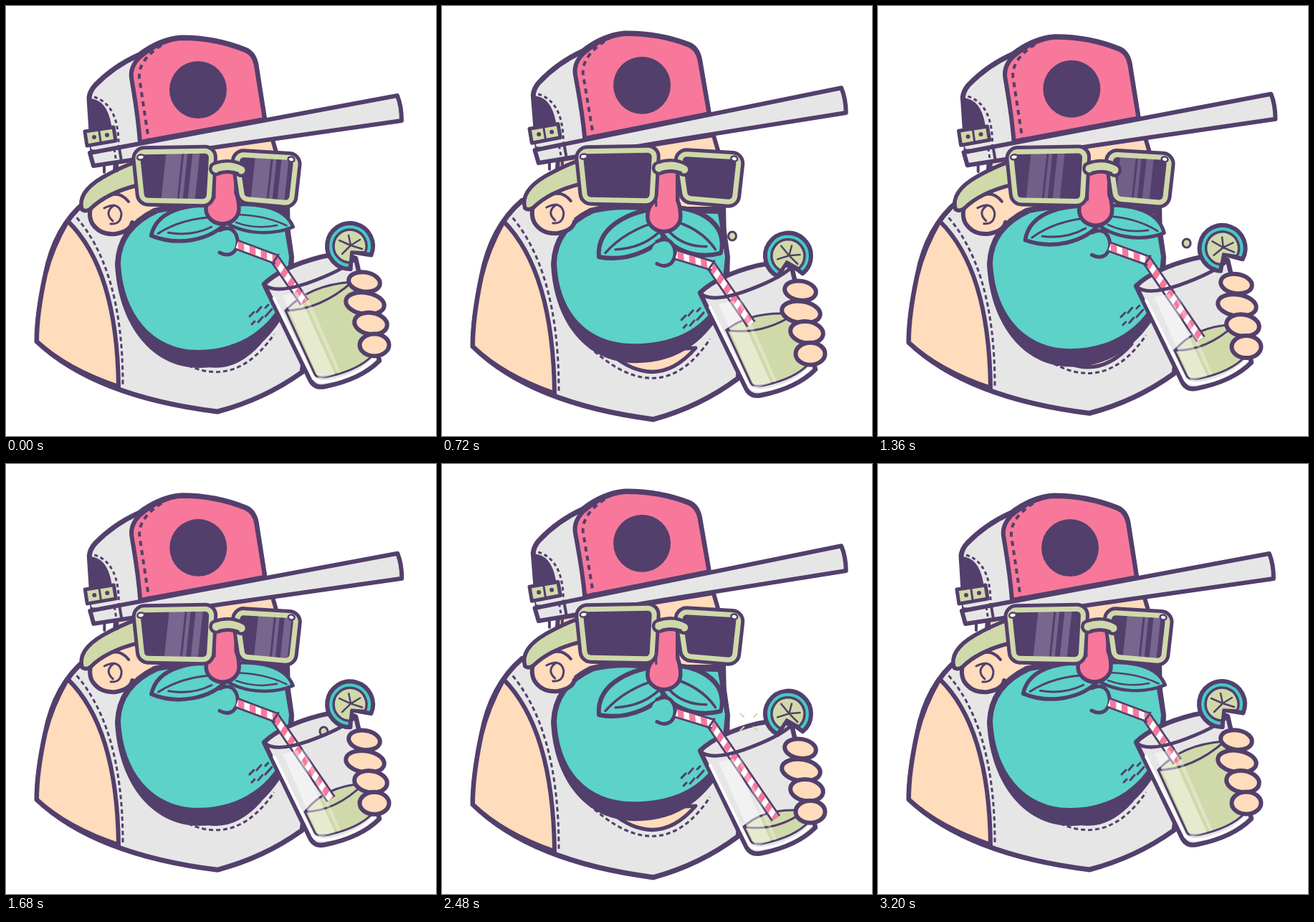
Recreate the animation shown at these times as an HTML page with a canvas. Size 600 by 600 pixels, loop 3.28 s.

```html
<!DOCTYPE html>
<html lang="en">
<head>
<meta charset="utf-8">
<title>Sipping</title>
<style>
  html, body { margin: 0; width: 100%; height: 100%; overflow: hidden; background: #fff; }
  canvas { display: block; width: 100vw; height: 100vh; }
</style>
</head>
<body>
<canvas id="stage" width="600" height="600"></canvas>
<script>
const ctx = document.getElementById('stage').getContext('2d');
const INK = '#533f6c', PINK = '#f7789a', TEAL = '#5cd2c8', GREY = '#e6e6e6',
      LIME = '#d0d9a9', SKIN = '#ffdcbc', WHITE = '#fff';
const STEP = 80, COUNT = 41, BEAT = 20;
// frame, drop of the drink's surface
const LEVELS = [[0, 0], [9, 15], [17, 53], [25, 67], [28, 71], [31, 69], [35, 46], [40, 2], [41, 0]];

function path(d, fill, width = 0, stroke = INK, dash = []) {
  const p = new Path2D(d);
  if (fill) { ctx.fillStyle = fill; ctx.fill(p); }
  if (width) {
    ctx.strokeStyle = stroke;
    ctx.lineWidth = width;
    ctx.setLineDash(dash);
    ctx.lineCap = dash.length ? 'butt' : 'round';
    ctx.stroke(p);
  }
}

function rounded(corners, r) {
  const p = new Path2D(), n = corners.length;
  const [a, b] = [corners[0], corners[n - 1]];
  p.moveTo((a[0] + b[0]) / 2, (a[1] + b[1]) / 2);
  corners.forEach((c, i) => p.arcTo(...c, ...corners[(i + 1) % n], r));
  p.closePath();
  return p;
}

function oval(x, y, rx, ry, tilt, fill, width) {
  ctx.beginPath();
  ctx.ellipse(x, y, rx, ry, tilt, 0, Math.PI * 2);
  ctx.fillStyle = fill;
  ctx.fill();
  if (width) {
    ctx.setLineDash([]);
    ctx.strokeStyle = INK;
    ctx.lineWidth = width;
    ctx.stroke();
  }
}

// Draws in a moved, turned (degrees) and scaled space.
function at(x, y, turn, draw, sx = 1, sy = 1) {
  ctx.save();
  ctx.translate(x, y);
  ctx.rotate(turn * Math.PI / 180);
  ctx.scale(sx, sy);
  draw();
  ctx.restore();
}

function lookup(points, x) {
  const i = points.findIndex(p => p[0] > x);
  const [x0, y0] = points[i - 1], [x1, y1] = points[i];
  return y0 + (y1 - y0) * (x - x0) / (x1 - x0);
}

function body(s) {
  at(0, -11.6 * s, 0, () => {
    path('M112 272 Q68 308 55 375 Q43 430 43 468 C80 503 150 548 295 566 Q360 549 413 511 L416 490 L396 390 L300 340 L200 280 Z', GREY, 7);
    path('M86 300 Q64 338 55 375 Q43 430 43 468 Q85 507 157 531 Q155 367 86 300 Z', SKIN, 6);
    path('M92 288 Q163 362 163 528', null, 3, INK, [6, 4]);
    path('M235 478 Q300 530 354 470 Z', SKIN, 5);
    path('M205 468 Q305 558 374 458', null, 3, INK, [6, 4]);
  }, 1, 1 + 0.04 * s);
}

function face(s) {
  const x = 9 * s;
  path(`M${153 + x} 215 L${150 + x} 262 L200 330 L394 330 L393 275 L${377 + x} 204 L${370 + x} 180 Z`, SKIN, 6);
  path(`M${150 + x} 250 L${125 + x} 268 L${140 + x} 322 L${210 + x} 300 L${205 + x} 250 Z`, SKIN);
}

function beard(s) {
  const low = 505 - 7 * s, chin = 480 - 9 * s;
  path(`M152 360 Q154 308 206 282 Q250 270 300 280 L392 280 L402 350 L400 410 C370 468 330 ${low} 270 ${low} C200 ${low} 156 440 152 360 Z`, INK);
  path(`M160 358 Q162 312 212 289 Q250 280 300 288 L385 290 L395 350 L390 402 C372 445 330 ${chin} 268 ${chin} C205 ${chin} 163 430 160 358 Z`, TEAL);
  at(-6 * s, 5 * s, 0, () => path('M340 433l6-6M350 427l6-7M352 441l6-7M362 433l9-10M362 421l4-4M347 440l-4 4', null, 3));
}

function ear() {
  path('M125 266 Q112 287 120 303 Q131 320 153 318 Q174 314 176 302 L171 266 Z', SKIN);
  path('M125 266 Q112 287 120 303 Q131 320 153 318 Q174 314 176 302', null, 6);
  path('M137 268 Q157 255 171 273', null, 4);
  path('M137 282 Q157 272 161 289 Q161 305 146 304 M151 278 Q136 288 149 300', null, 3);
}

function leaf(x, y, turn, flip, len) {
  at(x, y, turn, () => {
    path('M-4 -9 C30 -26 84 -36 104 0 C75 24 28 32 -4 12 Z', TEAL, 5.5);
    path('M8 2 Q55 -11 94 0 M20 13 Q50 18 80 3', null, 3);
  }, len, flip);
}

function whiskers(s) {
  leaf(302 + 10 * s, 290 + 3 * s, 163 - 15 * s, -1 - 0.15 * s, 1 + 0.05 * s);
  leaf(305 + 7 * s, 288 + 4 * s, 12 + 23 * s, 0.8 + 0.45 * s, 0.94 - 0.04 * s);
}

function nose(s) {
  const y = 283 + 11 * s;
  at(8 * s, 0, 0, () => {
    path(`M290 230 L288 ${y - 21} Q279 ${y - 13} 279 ${y} A23 21 0 0 0 325 ${y} Q325 ${y - 13} 321 ${y - 22} L321 230 Z`, PINK, 5.5);
    path(`M291 250 V${y - 15}`, null, 3);
  });
}

function hat(s) {
  at(118 + 13 * s, 215 - 4 * s, -0.95 * s, () => {
    ctx.translate(-118, -215);
    path('M137 220 V232 M155 220 V230', null, 4);
    path('M121 207 L116 128 Q117 119 124 111 Q150 84 186 68 Q215 46 245 44 Q292 44 334 61 Q346 66 349 82 L361 160 Z', GREY, 7);
    path('M187 190 C184 150 179 125 175 100 Q173 85 186 72 Q215 47 245 45 Q292 45 334 62 Q346 67 349 83 L361 158 Z', PINK, 6);
    path('M228 48 Q184 72 186 100 L199 187', null, 4, INK, [7, 6]);
    oval(268, 117, 40, 40, 0, INK);
    path('M116 129 Q141 130 147 166 L149 194 L120 200 Z', INK);
    path('M123 127 Q158 138 157 196', null, 3, INK, [5, 4]);
    path('M122 197 L146 193', null, 7, GREY);
    path('M110 175 L150 169 L153 188 L113 195 Z', LIME, 5);
    path('M130 175 L132 189', null, 3);
    oval(123, 183, 3, 3, 0, INK);
    oval(141, 180, 3, 3, 0, INK);
    path('M117 205 L546 125 Q552 140 552 160 L300 196 L122 223 Z', GREY, 6);
    path('M158 198 L161 216', null, 4);
    path('M151 199 L154 218', null, 3, INK, [5, 4]);
  });
}

function lens(corners, left, alpha, shift) {
  const rim = rounded(corners, 9);
  path(rim, INK, 17);
  if (alpha > 0) {
    ctx.save();
    ctx.clip(rim);
    ctx.globalAlpha = alpha;
    for (const [x, w] of [[34, 22], [59, 5], [71, 10]]) {
      path(`M${left + x + shift} 200 h${w} l-9 85 h${-w} Z`, '#77668e');
    }
    ctx.restore();
  }
  path(rim, null, 7, LIME);
}

function shades(s, frame) {
  const alpha = Math.min(1, (0.48 - s) * 3);
  const shift = ((frame + BEAT / 2) % BEAT - BEAT / 2) * 4;
  at(10 * s, -s, 0, () => {
    lens([[183, 204], [287, 202], [283, 273], [190, 271]], 190, alpha, shift);
    lens([[321, 207], [405, 212], [398, 275], [330, 269]], 315, alpha, shift);
    path('M293 227 Q312 220 328 229', null, 20);
    path('M293 227 Q312 220 328 229', null, 11, LIME);
    path('M297 232 Q312 228 324 233', null, 2.5);
    oval(188, 211, 5, 3.5, -0.2, WHITE, 2.5);
    oval(398, 214, 4.5, 3.5, 0.2, WHITE, 2.5);
  });
}

function temple(s) {
  at(10 * s, -2 * s, 0, () =>
    path('M106 284 Q99 260 135 239 Q160 225 180 218 L184 250 Q140 261 118 283 Q111 288 106 284 Z', LIME, 5.5));
}

function mouth(s) {
  at(2 * s, 16 * s, 0, () => {
    oval(307, 329, 17, 17, 0, TEAL);
    path('M298 313 Q314 305 321 319 Q327 334 317 344 Q309 350 298 344', null, 5);
  });
}

function tube(x0, y0, x1, y1) {
  const len = Math.hypot(x1 - x0, y1 - y0);
  at(x0, y0, Math.atan2(y1 - y0, x1 - x0) * 180 / Math.PI, () => {
    path(`M0 -7.5 H${len} V7.5 H0 Z`, INK);
    ctx.save();
    ctx.clip(new Path2D(`M0 -4.8 H${len} V4.8 H0 Z`));
    path(`M0 -5 H${len} V5 H0 Z`, WHITE);
    for (let x = 4; x < len + 8; x += 17) path(`M${x} 5 h9 l-4 -10 h-9 Z`, PINK);
    ctx.restore();
  });
}

function drop(frame, dy) {
  if (frame < 7 || frame > 27) return;
  const n = frame - 9;
  oval(405 + 3.2 * n, 321 - 4.94 * n + 0.773 * n * n - dy, 5.5, 6, 0, LIME, 3);
}

function burst(frame) {
  if (frame < 29 || frame > 36) return;
  const age = frame - 29, r = 4 + 2.8 * age, len = 9 - age;
  for (let i = 0; i < 4; i++) {
    at(428, 360, 45 + (frame - 31) * 11.25 + i * 90, () =>
      path(`M${r} 0 h${len}`, null, 2.4 - 0.25 * age, LIME));
  }
}

function lime(s) {
  const wedge = r => {
    const c = a => `${r * Math.cos(a)} ${r * Math.sin(a)}`;
    return `M2 8 L${c(1.55)} A${r} ${r} 0 1 1 ${c(0.4)} Z`;
  };
  at(480 + 3 * s, 335 + 1.5 * s, 28 * s, () => {
    path(wedge(32), '#45c9c4', 6);
    path(wedge(23), LIME, 3.5);
    path('M1 -1 L-15 -8 M1 -1 L-11 11 M1 -1 L-2 -15 M1 -1 L14 -9 M1 -1 L17 4', null, 2.5);
  });
}

function drink(s, frame) {
  const dy = 12.5 * s;
  at(0, dy, 0, () => {
    path('M360 388 L424 521 Q430 534 445 531 Q495 521 521 495 L488 352 Q470 343 440 350 Q385 364 360 388 Z', GREY, 6.5);
    path('M374 408 L429 520 Q437 527 460 522 Q497 512 515 491', null, 4, WHITE);
    drop(frame, dy);

    const ly = 425 + lookup(LEVELS, frame), lx = 390 + 0.45 * (ly - 425);
    const ry = ly - 40 + 18 * s, rx = 484 + 0.27 * (ry - 388);
    const mx = (lx + rx) / 2, my = (ly + ry) / 2;
    const back = `Q${mx - 14} ${my - 16} ${rx} ${ry}`;
    const front = `Q${mx + 2} ${my + 19} ${lx} ${ly}`;
    path(`M${lx} ${ly} ${back} L512 487 Q492 508 450 517 Q434 520 431 514 Z`, LIME, 3);

    // the straw shows down to where it meets the surface
    const bx = 375, by = 353 - 3.5 * s, slope = (ry - ly) / (rx - lx);
    const t = (ly + slope * (bx - lx) - by) / (0.825 - 0.565 * slope);
    tube(bx, by, bx + 0.565 * t, by + 0.825 * t);
    tube(322 + 5 * s, 333 + 2 * s, bx + 3, by + 1);
    path(`M${bx - 3} ${by + 6} L${bx + 5} ${by - 6}`, null, 3);
    path(`M${rx} ${ry} ${front}`, null, 3);

    path('M386 404 L407 399 L459 514 L437 521 Z', 'rgba(255,255,255,.45)');
    path('M412 399 L417 397 L467 511 L463 513 Z', 'rgba(255,255,255,.3)');
    path('M361 389 Q375 402 420 387 Q468 370 486 354', null, 5);
    lime(s);
    oval(500, 385, 22, 13.5, 0.15, SKIN, 6);
    oval(501, 415, 27, 15, 0.15, SKIN, 6);
    oval(509, 443, 23, 15, 0.15, SKIN, 6);
    oval(514, 473, 20.5, 15.5, 0, SKIN, 6);
  });
  burst(frame);
}

function draw(now) {
  const frame = Math.floor(now / STEP) % COUNT;
  const s = (1 - Math.cos(2 * Math.PI * frame / BEAT)) / 2;
  ctx.fillStyle = WHITE;
  ctx.fillRect(0, 0, 600, 600);
  ctx.lineJoin = 'round';
  body(s);
  face(s);
  beard(s);
  at(9 * s, -s, 0, ear);
  temple(s);
  whiskers(s);
  nose(s);
  hat(s);
  shades(s, frame);
  mouth(s);
  drink(s, frame);
}

const start = performance.now();
function tick() {
  draw(performance.now() - start);
  requestAnimationFrame(tick);
}
tick();
</script>
</body>
</html>
```
